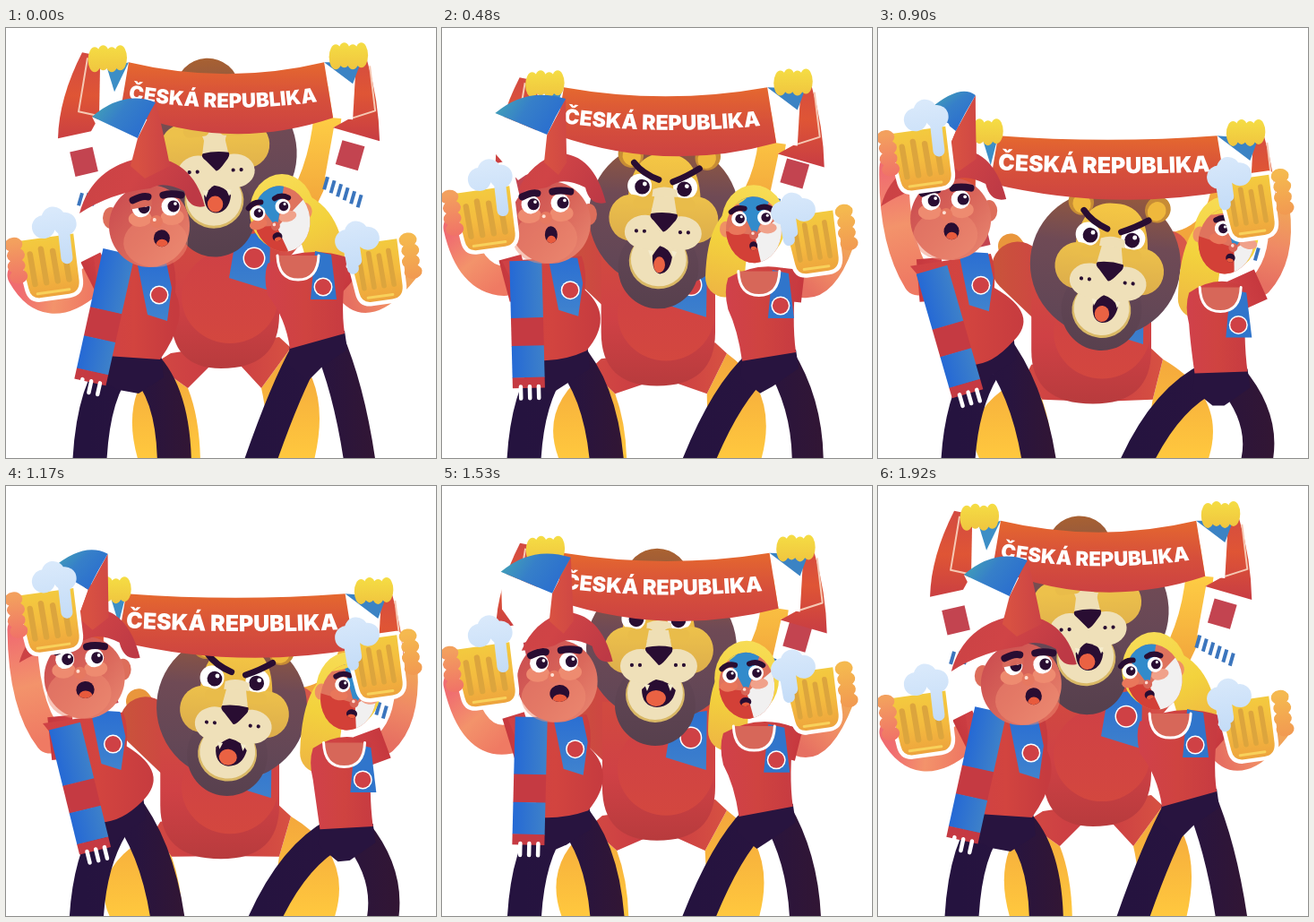
Animation, 480 px wide and 480 px high, one loop 1950 ms. Source, as an HTML page with a canvas:

```html
<!DOCTYPE html>
<html lang="cs">
<meta charset="utf-8">
<style>
html, body { margin: 0; height: 100%; overflow: hidden; background: #fff }
canvas { display: block; width: 480px; height: 480px }
</style>
<canvas id="stage" width="480" height="480"></canvas>
<script>
const c = document.getElementById('stage').getContext('2d');
const LOOP = 1950, STEP = 30;
const RED = '#cf4145', BLUE = '#2f73cd', NAVY = '#28143f', INK = '#290d32', WHITE = '#fff';
let t = 0, s = 0, sing = 0;

// Everyone sways between a raised pose (s = 0) and a crouch (s = 1); parts lag or lead the beat.
const swing = lag => (1 - Math.cos(2 * Math.PI * (t - lag) / LOOP)) / 2;
const mix = (a, b) => a + (b - a) * s;
const pt = (x0, y0, x1, y1) => [mix(x0, x1), mix(y0, y1)];
// A quick turn of the head from one side to the other.
function flip(a, b) {
  const u = Math.max(0, Math.min(1, (s - .2) / .25));
  return a + (b - a) * u * u * (3 - 2 * u);
}
const off = (a, x, y) => [a[0] + x, a[1] + y];
const around = (a, ...pts) => pts.map(q => q.map((v, i) => v + a[i % 2]));

function grad(x0, y0, x1, y1, ...cols) {
  const g = c.createLinearGradient(x0, y0, x1, y1);
  cols.forEach((col, i) => g.addColorStop(i / (cols.length - 1), col));
  return g;
}
// Points are [x, y] for lines or [cx, cy, x, y] for curves.
function trace(pts) {
  c.beginPath();
  pts.forEach((q, i) => q.length > 2 ? c.quadraticCurveTo(...q) : i ? c.lineTo(...q) : c.moveTo(...q));
}
function shape(fill, ...pts) { trace(pts); c.closePath(); c.fillStyle = fill; c.fill(); }
function line(col, w, cap, ...pts) {
  trace(pts); c.strokeStyle = col; c.lineWidth = w; c.lineCap = cap; c.lineJoin = 'round'; c.stroke();
}
function oval(fill, x, y, rx, ry = rx, rot = 0) {
  c.beginPath(); c.ellipse(x, y, rx, ry, rot, 0, 7); c.fillStyle = fill; c.fill();
}
function local([x, y], deg, draw) {
  c.save(); c.translate(x, y); c.rotate(deg * Math.PI / 180); draw(); c.restore();
}
function badge([x, y], r = 9) { oval(WHITE, x, y, r + 1.5); oval(RED, x, y, r); }
function eye(x, y, r, px = 1, py = 0) {
  oval(WHITE, x, y, r); oval(INK, x + px, y + py, r * .62);
  oval(WHITE, x + px + r * .2, y + py - r * .25, r * .18);
}
function mouth(x, y, rx, ry) {
  oval(INK, x, y, rx, ry);
  c.save(); c.clip(); oval('#e85a3c', x, y + ry * .75, rx * .75, ry * .65); c.restore();
}

const rightFist = () => pt(382, 30, 412, 121);

function lionBody() {
  s = swing(60) ** 1.2;
  const hand = rightFist();
  s = swing(0);
  const by = mix(380, 420), hem = by + mix(22, -5);
  const xl = mix(203, 183), xr = mix(285, 307), l = mix(184, 171), r = 305;
  const outL = [165, hem - 27], outR = [318, hem - 45];

  const skin = grad(0, 360, 0, 480, '#f3a53c', '#ffc83e');
  const thigh = (outer, bend, foot, inner, hip) =>
    shape(skin, outer, [bend, outer[1] + 45, foot, 490], [inner, 490], [inner, hem + 35, hip, hem]);
  thigh(outL, mix(126, 80), mix(150, 118), mix(217, 195), xl);
  thigh(outR, mix(366, 396), mix(342, 366), mix(293, 300), xr);

  line(grad(0, 90, 0, 200, '#ffd145', '#f2a53c'), 31, 'round', off(hand, -22, 50), [hand[0] - 24, hand[1] + 120, 325, by - 175]);
  line('#e9963c', 28, 'round', [148, by - 176], [160, by - 160]);
  line(grad(125, 0, 200, 0, '#c9553a', RED), 58, 'round', [156, by - 152], [200, by - 110]);
  line(grad(270, 0, 340, 0, RED, '#d8584a'), 46, 'round', [324, by - 170], [280, by - 115]);

  shape(grad(160, 0, 320, 0, '#d34a43', '#c93a43', '#d75242'), [l, outL[1] - 12], outL, [xl, hem], [228, by - 3], [262, by - 3], [xr, hem], outR, [r, outR[1] - 12]);
  shape(grad(0, by - 150, 0, by, '#d14a40', RED, '#b83b3d'), [l, by - 155], [r, by - 155], [r, by - 60], [r, by, 240, by], [l, by, l, by - 60]);
  oval(grad(0, by - 130, 0, by - 28, RED, '#d3473f'), 250, by - 80, 54, 52);

  const mark = pt(277, 257, 279, 318);
  shape(grad(0, mark[1] - 30, 0, mark[1] + 35, '#2b70d0', '#3e80cc'), ...around(mark, [-20, -25], [18, -30], [17, 36], [-28, 22]));
  badge(mark, 11);
}

function lionHead() {
  s = swing(-40);
  const back = (1 - s) ** 4, open = 15 - 4 * sing;
  local(pt(234, 148, 258, 272), mix(-3, 6), () => {
    const mane = grad(0, -120, 0, 60, '#ab6230', '#6f4a55', '#604656');
    oval(mane, mix(-5, 5), mix(-82, -95), 35, 33);
    oval(mane, mix(7, -5), -8, 84, 82);
    oval(grad(0, 0, 0, 100, '#654757', '#57404d'), -4, mix(61, 43), 45, 46);
    for (const d of [-1, 1]) {
      oval('#c78c35', d * 43 + 4, -74, 14, 15, d * .5); oval('#efb83c', d * 42 + 4, -72, 10, 11, d * .5);
    }
    const eyes = -39 - 10 * back, cheeks = -3 - 14 * back;
    shape(grad(0, -85, 0, 0, '#f7cb45', '#e3ad43'), [-41, -10], [-42, -78, 0, -76], [42, -78, 41, -10]);
    eye(-28, eyes, 13.5, 3, 1); eye(23, eyes, 13.5, -1, 2);
    shape('#efdfb5', [-13, -36], [0, -42, 14, -36], [17, 5], [-17, 5]);
    for (const d of [-1, 1]) {
      oval(grad(0, -30, 0, 28, '#edc14b', '#dbab4b'), d * 36, cheeks, 25, 26);
      line('#e9bc4a', 13, 'round', [d * 28, cheeks - 17], [d * 12, cheeks - 18]);
    }
    shape('#efdfb5', [-11, -28], [11, -28], [17, 5], [-17, 5]);
    oval('#d9b866', -4, 44, 33, 31);
    oval('#efe0b9', -4, 42, 31, 30);
    for (const d of [-1, 1]) oval('#efe0b9', d * 20, 12, 23, 19);
    shape(INK, [-open, 38], [-open * .5, 29, -3, 27], [open * .6, 29, open, 39], [open * .8, 57, -2, 58], [-open, 57, -open, 38]);
    oval('#ea6243', -3, 48, open * .58, 9);
    for (const d of [-1, 1]) {
      shape('#f5eccd', [d * 13 - 3, 32], [d * 13 + 3, 33], [d * 13, 40]);
      for (const x of [20, 29]) oval(INK, d * x - 1, 11, 2.1);
    }
    shape(INK, [-14, -9], [0, -12, 15, -9], [17, -5, 11, 1], [1, 14, -1, 10], [-11, -1], [-17, -6, -14, -9]);
    line(INK, 7, 'round', [-35, -65], [-25, -53, -7, -47]);
    line(INK, 7, 'round', [38, -61], [25, -52, 9, -45]);
  });
}

function fist(f) {
  for (let i = 0; i < 4; i++) oval(grad(0, f[1] - 14, 0, f[1] + 16, '#f5dd44', '#f0c53f'), f[0] - 14 + i * 9.5, f[1] + (i % 2 ? 0 : 2), 7.5, 14);
}
function emblem(at, deg) {
  local(at, deg, () => { c.fillStyle = '#c34450'; c.fillRect(-13, -14, 26, 28); });
}

function scarf() {
  s = swing(60) ** 1.2;
  const tl = pt(137, 38, 134, 125), tr = pt(355, 38, 380, 125);
  const fl = pt(113, 33, 118, 120), fr = rightFist();
  const sag = mix(13, 4), mid = (tl[0] + tr[0]) / 2, top = tl[1], drop = mix(136, 108);
  const bl = off(tl, -9, 53), br = off(tr, 10, 62);
  const cloth = y => grad(0, y - 10, 0, y + 95, '#d24a43', '#df5535', '#c83d43');
  const fringe = (f, n, x, y, dy) => {
    for (let i = 0; i < n; i++) line('#3b75bd', 4, 'butt', off(f, x + i * 7.5, y + i * dy), off(f, x - 4 + i * 7.5, y + 14 + i * dy));
  };

  shape(WHITE, ...around(fl, [-55, 90], [-9, 65], [0, 140], [-40, 158]));
  fringe(fl, 3, -28, 151, 0);
  emblem(off(fl, flip(-26, -8), 116), -13);
  shape(cloth(fl[1]), ...around(fl, [-28, -6], [-8, -2], [-7, 62], [-18, 82], [-55, 90], [-54, 45, -28, -6]));
  line('#f6c9b4', 2, 'butt', ...around(fl, [-22, 0], [-32, 60], [-9, 65]));

  shape(WHITE, ...around(fr, [-16, 80], [36, 95], [16, drop + 16], [-26, drop]));
  fringe(fr, 6, -23, drop, 4);
  emblem(off(fr, 2, drop - 24), 16);
  shape(cloth(fr[1]), ...around(fr, [3, 10], [21, 6], [34, 50, 35, 96], [-17, 81], [3, 70]));
  line('#f6c9b4', 2, 'butt', ...around(fr, [24, 12], [30, 62], [5, 70]));

  shape(WHITE, tl, bl, off(fl, -9, 64), off(fl, -8, 10));
  shape('#3d8ec6', tl, off(fl, 0, 12), off(fl, 8, 38));
  shape(WHITE, tr, br, off(fr, 5, 72), off(fr, 8, 20));
  shape('#3b83c4', tr, off(fr, 14, 8), off(fr, 5, 32));

  shape(grad(0, top, 0, top + 82, '#e5682f', '#d64f3b', '#cb4142'), tl, [mid, top + sag * 2, ...tr], br, [mid, top + 2 * (sag + 67) - 58, ...bl]);
  const text = 'ČESKÁ REPUBLIKA', half = (tr[0] - tl[0]) / 2;
  c.fillStyle = WHITE; c.textAlign = 'center';
  c.font = `900 ${half * .204}px Inter, "Liberation Sans", sans-serif`;
  let x = mid - 4 - c.measureText(text).width / 2;
  for (const ch of text) {
    const w = c.measureText(ch).width, u = (x + w / 2 - mid) / half;
    local([x + w / 2, top + sag * (1 - u * u * .65) + 37.5 + u], -u * sag * .75, () => c.fillText(ch, 0, 0));
    x += w;
  }
  fist(fl); fist(fr);
}

function legs(hipL, kneeL, footL, hipR, kneeR, footR, w) {
  const fill = grad(footL, 0, footR + 20, 0, '#25133f', NAVY, '#321634');
  line(fill, w, 'butt', hipL, [...kneeL, footL, 492]);
  line(fill, w, 'butt', hipR, [...kneeR, footR, 492]);
}
function arm(shoulder, sleeve, bend, hand, w, ...skin) {
  line(grad(...sleeve, ...hand, ...skin), w, 'round', sleeve, [...bend, ...hand]);
  line(grad(...shoulder, ...sleeve, RED, '#c6383e'), w * 1.45, 'butt', shoulder, sleeve);
}

function stripedScarf(n, tip) {
  const len = Math.hypot(tip[0] - n[0], tip[1] - n[1]), bands = [0, .45, .67, .92, 1];
  local(n, Math.atan2(n[0] - tip[0], tip[1] - n[1]) * 180 / Math.PI, () => {
    bands.slice(1).forEach((z, i) => {
      c.fillStyle = i % 2 ? '#c53a42' : grad(-18, 0, 18, 0, '#2569d5', '#3e81c9');
      c.fillRect(-18, bands[i] * len, 36, (z - bands[i]) * len + .5);
    });
    for (const x of [-9, 1, 11]) line(WHITE, 4.5, 'round', [x, len - 1], [x, len + 12]);
  });
}

function hat(head) {
  // The brim looks shorter while the head faces the viewer.
  const facing = (4 * s * (1 - s)) ** 2;
  const left = off(head, -78 + 42 * facing, -14 - 22 * facing), right = off(head, 62, -22);
  const peak = off(head, flip(-5, 9), -77), rim = off(head, 1, -42);
  const tip = off(head, -64 + 42 * s ** 4, -122), top = off(head, mix(7, 28), -138), fold = off(head, mix(-13, 6), -98);

  shape(WHITE, tip, fold, off(peak, -16, 10), off(peak, -45, 30), off(tip, flip(10, 0), flip(20, 45)));
  shape(grad(peak[0] - 55, peak[1] - 30, peak[0] + 55, peak[1] + 40, '#c94245', '#d04446', '#bd3945'),
    left, [left[0] + 14, peak[1] + 10, ...peak], [right[0] - 14, peak[1], ...right],
    [right[0] - 18, right[1] + 4, right[0] - 23, rim[1] + 3], [rim[0] + 15, rim[1] - 9, ...rim], [left[0] + 35, rim[1] + 5, ...left]);
  shape(grad(fold[0], 0, top[0] + 15, 0, '#d85142', '#cb4345'), fold, top,
    [top[0] + flip(7, 0), top[1] + 25, top[0] + flip(16, 1), peak[1] + 10], [peak[0], peak[1] + 24], [peak[0] - 16, peak[1] + 10]);
  shape(grad(tip[0], top[1], ...fold, '#44a6b4', '#367fc9', '#2b6fce'), tip, [tip[0] + 35, top[1] - 14, ...top], [top[0] - 12, fold[1] - 20, ...fold]);
}

function man(glass) {
  s = swing(0);
  const a = pt(98, 255, 35, 266), b = pt(185, 257, 125, 252), d = pt(172, 370, 150, 350), e = pt(112, 366, 101, 376);
  legs(off(e, 16, 4), pt(96, 405, 91, 425), mix(93, 89), off(d, -22, 2), pt(188, 405, 169, 405), mix(188, 181), 38);
  shape(NAVY, off(e, -2, -4), off(d, 1, -6), off(d, 4, 20), off(d, -24, 38), off(e, 14, 38), off(e, -8, 28));
  arm(pt(116, 272, 72, 280), pt(94, 283, 44, 282), pt(46, 325, 16, 235), off(glass, -30, 10), 33, '#ef7a63', '#f3936b', '#f06c70');
  shape(grad(a[0], 0, d[0] + 15, 0, RED, '#d2443f', '#c63b3f'), a, b, [b[0] + 6, b[1] + 15, b[0] + 4, b[1] + 38],
    [...pt(204, 325, 182, 320), ...d], [(d[0] + e[0]) / 2, e[1] + 2, ...e], [e[0] - 5, a[1] + 70, ...a]);

  const mark = pt(171, 298, 114, 287);
  shape(grad(0, mark[1] - 36, 0, mark[1] + 28, '#2b6fd2', '#4083ce'), ...around(mark, [-25, -38], [8, -36], [14, -8], [9, 29], [-13, 22]));
  badge(mark);
  stripedScarf(pt(126, 250, 59, 270), pt(94, 395, 100, 408));

  const head = pt(160, 221, 80, 213);
  oval('#dd6e5b', head[0] + flip(-43, 43), head[1] - 9, 9, 12);
  oval(grad(head[0] - 42, head[1] - 30, head[0] + 42, head[1] + 40, '#cb4d50', '#d9665a', '#e98670'), ...head, 45, 46);
  local(off(head, flip(7, -6), -22), -3, () => {
    oval('rgba(240,140,115,.5)', -2, 40, 36, 28);
    for (const x of [-18, 18]) oval('#ee8b70', x, 13, 13, 9);
    for (const x of [-16, 17]) eye(x, 1, 10.5, 3);
    c.globalAlpha = (1 - s) ** 8;
    shape('#d8685a', [-28, -9], [-4, -9], [-4, -1], [-28, 2]);
    c.globalAlpha = 1;
    line(INK, 8, 'round', [-25, -8], [-14, -13, -8, -11]);
    line(INK, 8, 'round', [9, -12], [18, -14, 29, -11]);
    oval('#e67860', 0, 17, 7); oval('#ffe1d4', -2, 15, 2);
    mouth(5, 36, 9 - 2 * sing, 9.5);
  });
  hat(head);
}

function woman(glass) {
  s = swing(0);
  const head = pt(308, 213, 390, 238), lock = off(head, flip(48, -32), mix(42, 65));
  const hair = grad(head[0], head[1] - 50, lock[0], lock[1] + 25, '#f7dc55', '#f3d23d', '#eeb443');
  line(hair, 44, 'round', off(head, 0, -10), [head[0] + flip(40, -30), head[1] - 10, ...lock]);
  oval(hair, head[0], head[1] - 8, 36, 42);

  const a = pt(292, 263, 348, 296), b = pt(381, 256, 411, 290), d = pt(378, 341, 413, 384), e = pt(317, 358, 354, 386);
  legs(off(e, 18, 4), pt(311, 405, 320, 414), mix(281, 285), off(d, -19, 6), pt(384, 405, 437, 440), mix(396, 421), 35);
  shape(NAVY, off(e, 0, -6), off(d, 0, -3), off(d, 3, 18), off(d, -26, 38), off(e, 20, 36), off(e, -2, 18));
  arm(pt(358, 272, 398, 300), pt(379, 291, 428, 286), pt(404, 327, 455, 255), off(glass, 34, 2), 25, '#e66f61', '#ef8965', '#f1a458');
  shape(grad(a[0], 0, d[0], 0, '#d0414a', '#cf4340', '#c73b41'), a, [(a[0] + b[0]) / 2, a[1] - 22, ...b],
    [d[0] - 5, (b[1] + d[1]) / 2 + 10, ...d], e, [e[0] - 5, e[1] - 35, a[0], a[1] + 35], [a[0] - 5, a[1] + 15, ...a]);

  const mark = pt(354, 289, 403, 332);
  shape('#3075cb', ...around(mark, [-9, -40], [9, -36], [15, 14], [-14, 14]));
  badge(mark);
  const neck = around(pt(326, 264, 383, 300), [-23, -10], [-22, 17, 0, 17], [22, 17, 23, -10]);
  shape('#d76759', ...neck);
  line(WHITE, 3, 'round', ...neck);

  local(head, mix(-15, 10), () => {
    const turn = mix(-10, 8);
    oval('#ef9164', flip(28, -31), -2, 7, 9);
    c.save();
    c.beginPath(); c.ellipse(0, 0, 31, 37, 0, 0, 7); c.clip();
    c.fillStyle = '#df735d'; c.fillRect(-40, -45, 80, 90);
    shape('#f1f0f0', [turn + 2, 8], [50, -28], [50, 50], [turn + 7, 40]);
    shape('#d34037', [-50, -3], [turn + 2, 6], [turn + 9, 45], [-50, 45]);
    shape('#328bcb', [turn - 20, -45], [turn + 26, -45], [turn + 2, 9]);
    shape('#f5d548', [-40, -23], [turn - 10, -26, turn + 5, -46], [-40, -50]);
    shape('#f5d548', [40, -19], [turn + 30, -30, turn + 6, -46], [40, -50]);
    c.restore();
    for (const d of [-1, 1]) {
      oval(d < 0 ? '#e9775b' : '#f0a18a', turn + d * 17, -1, 10, 6);
      eye(turn + d * 14.5, -13, 8.5);
      line(INK, 6, 'round', [turn + d * 23, -21], [turn + d * 16, -27, turn + d * 8, -24]);
    }
    oval('#d86557', turn + 1, 6, 5); oval('#ffd9cf', turn, 4, 1.8);
    mouth(turn, 18, 5.5 - sing, 5);
  });
}

function mug(at, w, side) {
  const h = w / 2, left = side < 0;
  local(at, -8, () => {
    const glass = [[-h, -32], [h, -32], [h - 1, 21], [h - 2, 34, h - 14, 34], [-h + 17, 34], [-h + 7, 33, -h + 6, 22]];
    trace(glass); c.closePath(); c.strokeStyle = WHITE; c.lineWidth = 9; c.stroke();
    shape(grad(0, -32, 0, 35, '#f3ca3f', '#f4bb3f', '#eda33d'), ...glass);
    for (let i = 0; i < 4; i++) {
      const x = -h + w * (.2 + i * .2);
      line('#dca53d', w * .1, 'round', [x, i % 2 ? -20 : -16], [x + 1, 18]);
    }
    line('#f8d15b', 3, 'round', [-h + 15, 29], [h - 13, 29]);
    const foam = grad(0, -62, 0, 0, '#d9e9fb', '#c4dcf7'), fx = left ? 12 : -16, fy = left ? -48 : -41;
    for (let i = -1; i < 2; i++) oval(foam, fx + i * 12, fy + (i ? 4 : -4), 13, 13);
    line(foam, 13, 'round', [fx + side * -10, fy + 4], [fx + side * -9, -6]);
    if (!left) line(foam, 12, 'round', [fx - 4, fy], [fx - 4, -14]);
    const skin = left ? ['#f3a05e', '#f06f68'] : ['#f5b94f', '#f19752'];
    for (let i = 0; i < 4; i++)
      oval(grad(0, -32, 0, 18, ...skin), side * (left ? 36 : 40) + i % 2, -29 + i * 12, 10, 8);
  });
}

function draw(now) {
  t = Math.floor(now % LOOP / STEP) * STEP;
  sing = Math.sin(2 * Math.PI * t / LOOP);
  c.fillStyle = WHITE; c.fillRect(0, 0, 480, 480);
  lionBody(); lionHead(); scarf();
  s = swing(35);
  const leftGlass = pt(48, 266, 48, 142), rightGlass = pt(413, 271, 413, 197);
  man(leftGlass); woman(rightGlass);
  mug(leftGlass, 64, -1); mug(rightGlass, 56, 1);
}
const start = performance.now();
function tick() { draw(performance.now() - start); requestAnimationFrame(tick); }
tick();
</script>
</html>
```
